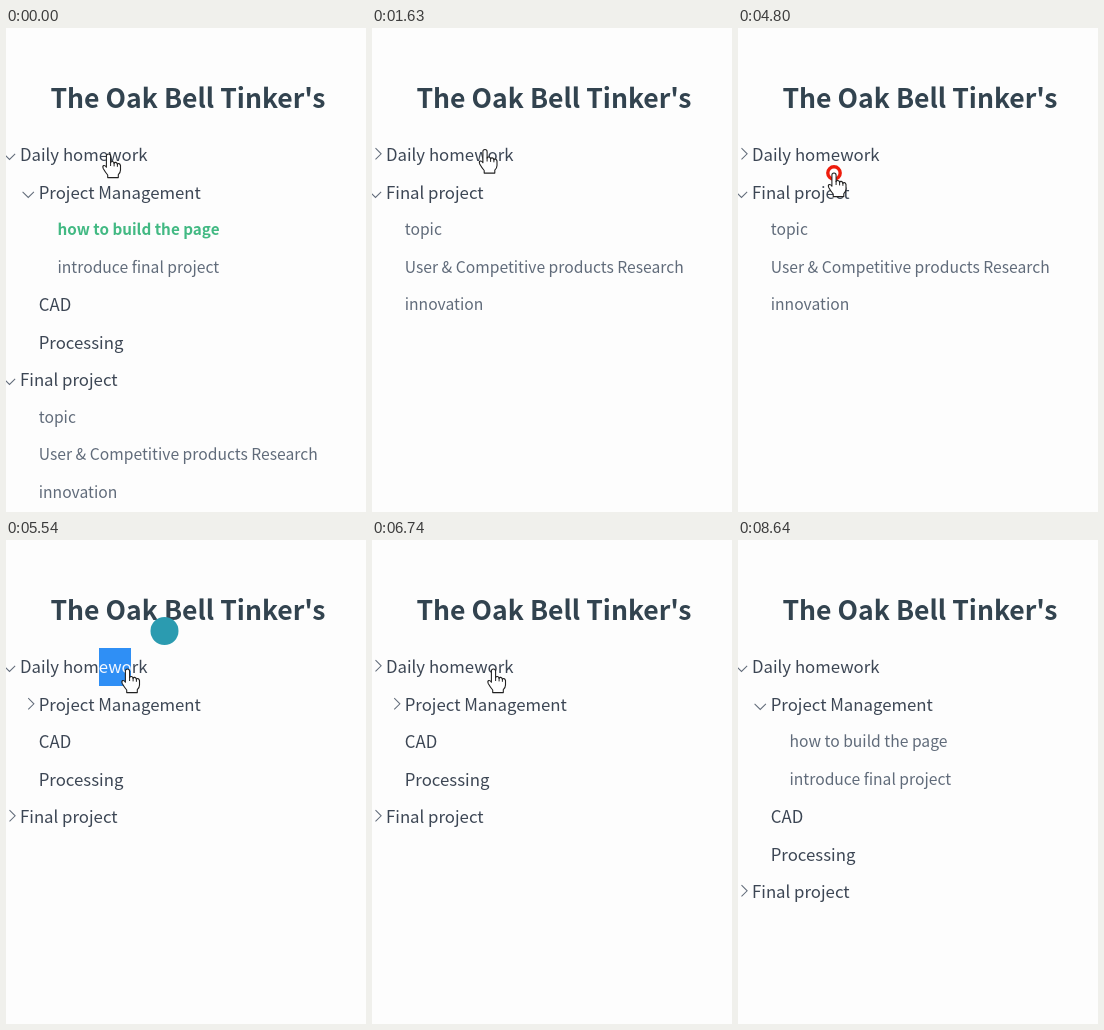
Write an HTML page that moves like this. It is 360 by 484 pixels and loops after 9.84 s.

```html
<!DOCTYPE html>
<html lang="en">
<head>
<meta charset="utf-8">
<title>Sidebar</title>
<style>
  html, body { margin: 0; width: 100%; height: 100%; overflow: hidden; background: #fdfdfd; }
  svg { display: block; width: 360px; height: 484px; }
  text { font-family: "Noto Sans CJK SC", "Noto Sans CJK JP", "Noto Sans CJK", sans-serif; }
  .title { font-size: 26.6px; font-weight: 700; fill: #32434f; }
  .main { font-size: 16.79px; fill: #3c4654; }
  .sub { font-size: 15.67px; fill: #606b7a; }
  .active { font-size: 15.25px; font-weight: 700; fill: #42b983; }
  .chev { fill: none; stroke: #626c7a; }
</style>
</head>
<body>
<svg viewBox="0 0 360 484">
  <defs><clipPath id="selClip"><rect id="selBox" x="93" y="108" height="38"/></clipPath></defs>
  <text class="title" x="182" y="80" text-anchor="middle">The Oak Bell Tinker's</text>
  <g id="rows"></g>
  <g id="sel">
    <rect id="selFill" x="93" y="108" height="38" fill="#2f8ff5"/>
    <text class="main" x="14" y="133" style="fill:#f4f8ff" clip-path="url(#selClip)">Daily homework</text>
  </g>
  <circle id="badge" cx="158.5" cy="91" r="14" fill="#2b9bb0"/>
  <g id="pointer">
    <circle id="ring" r="6.2" fill="#fff" stroke="#ee1c0c" stroke-width="3.4"/>
    <path fill="#fff" stroke="#222" stroke-width="1.1" stroke-linejoin="round" d="M-2.1 2.2Q-2.1 0 0 0T2.1 2.2V8.6Q2.6 7.3 4 7.5T5.6 9.4Q6 8.2 7.3 8.4T8.9 10.4Q9.4 9.4 10.5 9.6T12 11.5V16Q12 18.6 9.8 20.6V23.6H-.8V21Q-3 18.4-5.3 14.4-6.2 12.3-4.8 11.6-3.5 11.2-2.1 13.2Z"/>
    <path fill="none" stroke="#222" d="M2.1 8V12M5.6 9V12.4M8.9 10V12.8"/>
  </g>
</svg>
<script>
const LOOP = 9840, TOP = 127, PITCH = 37.5, SPIN = 130;
const $ = id => document.getElementById(id);

// Times at which each folder flips; all start open.
const flips = {
  daily: [1470, 5380, 6010, 6740],
  pm: [5380, 7740],
  final: [2910, 3940, 5380]
};
const isOpen = (key, t) => flips[key].filter(f => f <= t).length % 2 === 0;

// label, depth, parents, style, own folder key
const items = [
  ["Daily homework", 0, [], "main", "daily"],
  ["Project Management", 1, ["daily"], "main", "pm"],
  ["how to build the page", 2, ["daily", "pm"], "sub"],
  ["introduce final project", 2, ["daily", "pm"], "sub"],
  ["CAD", 1, ["daily"], "main"],
  ["Processing", 1, ["daily"], "main"],
  ["Final project", 0, [], "main", "final"],
  ["topic", 1, ["final"], "sub"],
  ["User & Competitive products Research", 1, ["final"], "sub"],
  ["innovation", 1, ["final"], "sub"]
];

// time, x, y of the fingertip; it rests where two keys agree
const path = [
  [0, 102.5, 126], [30, 102.5, 126], [270, 107, 133], [500, 107, 133], [900, 113, 121.5],
  [2200, 113, 121.5], [2540, 95, 158.5], [3440, 93.3, 159.5], [3540, 93, 161], [4400, 93, 161],
  [4600, 96, 145], [5070, 96, 145], [5320, 121.5, 129], [7070, 121.5, 129],
  [7340, 126, 159], [8270, 126, 159], [8640, 141, 490]
];
const presses = [[1230, 1470], [2700, 2910], [3740, 3940], [4770, 5380], [5800, 6010], [6510, 6740], [7510, 7740]];

function add(parent, tag, attrs, text) {
  const el = document.createElementNS("http://www.w3.org/2000/svg", tag);
  for (const k in attrs) el.setAttribute(k, attrs[k]);
  if (text) el.textContent = text;
  return parent.appendChild(el);
}

const rows = items.map(([label, depth, parents, style, key]) => {
  const g = add($("rows"), "g", {});
  const x = 14 + depth * 18.75;
  const text = add(g, "text", { class: style, x, y: 6 }, label);
  const chev = key && add(g, "path", { class: "chev", d: "M4-4V4H-4" });
  return { g, x, text, chev, parents, style, key };
});

const within = (t, [a, b]) => t >= a && t < b;
const show = (el, on) => el.setAttribute("visibility", on ? "visible" : "hidden");
const clamp = v => Math.min(1, Math.max(0, v));
const ease = k => k * k * (3 - 2 * k);

// -45 degrees points right, 45 points down
function chevAngle(key, t) {
  const last = flips[key].filter(f => f <= t).pop();
  const k = last === undefined ? 1 : clamp((t - last - 25) / SPIN);
  const turn = 45 * (1 - 2 * ease(k));
  return isOpen(key, t) ? -turn : turn;
}

function tipAt(t) {
  const i = path.findIndex(p => p[0] > t);
  if (i < 0) return path[path.length - 1].slice(1);
  const [t0, x0, y0] = path[i - 1], [t1, x1, y1] = path[i];
  const e = ease((t - t0) / (t1 - t0));
  return [x0 + (x1 - x0) * e, y0 + (y1 - y0) * e];
}

function draw(t) {
  let line = 0;
  for (const r of rows) {
    const on = r.parents.every(p => isOpen(p, t));
    show(r.g, on);
    if (!on) continue;
    const y = TOP + PITCH * line++;
    // baselines sit on whole pixels
    const snapped = r.style === "main" ? Math.round(y) : Math.floor(y - .5);
    r.g.setAttribute("transform", `translate(0 ${snapped})`);
    if (r.chev) r.chev.setAttribute("transform", `translate(${r.x - 10.5} -1.2) rotate(${chevAngle(r.key, t)})`);
  }
  rows[2].text.classList.toggle("active", t < 1470);

  const [x, y] = tipAt(t), pointing = t < 8640;
  $("pointer").setAttribute("transform", `translate(${x} ${y})`);
  show($("pointer"), pointing);
  show($("ring"), pointing && presses.some(p => within(t, p)));

  // selection snaps to letter edges
  const edge = [93, 102, 115, 125].filter(e => e <= x + 3.6).pop();
  for (const id of ["selBox", "selFill"]) $(id).setAttribute("width", edge - 93);
  show($("sel"), within(t, [5070, 6010]));
  show($("badge"), within(t, [5480, 6130]));
}

const start = performance.now();
function tick() {
  draw((performance.now() - start) % LOOP);
  requestAnimationFrame(tick);
}
tick();
</script>
</body>
</html>
```
